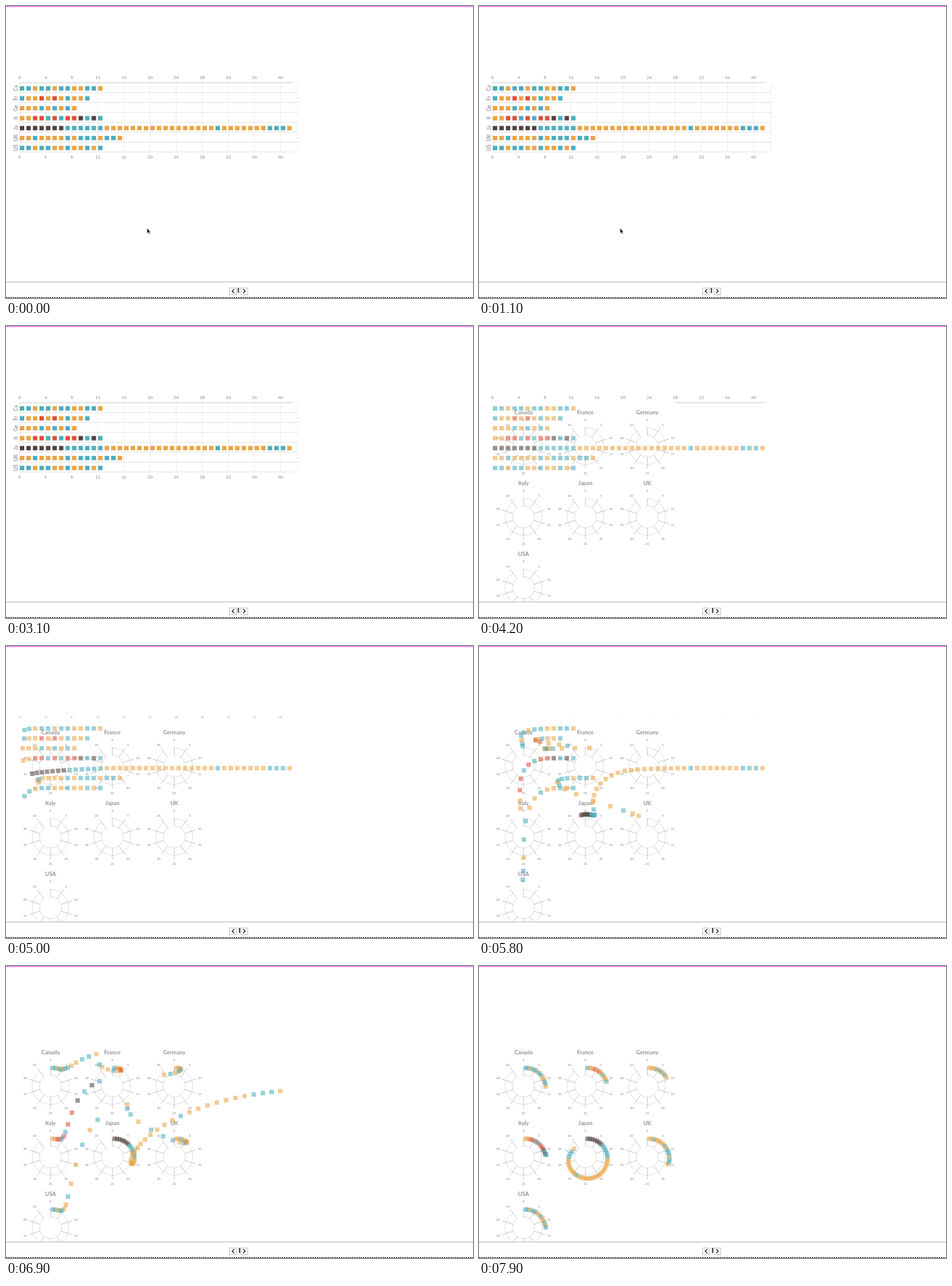
Animation of 640 by 400 pixels, one loop 8 s. Source, as an HTML page:

```html
<!DOCTYPE html>
<html lang="en">
<head>
<meta charset="utf-8">
<title>Bars to radial charts</title>
<style>
html, body { margin: 0; width: 100%; height: 100%; overflow: hidden; background: #fff; }
svg { display: block; width: 640px; height: 400px; }
text { font-family: Lato, "Open Sans", sans-serif; text-anchor: middle; }
.tick { font-size: 6px; fill: #888; }
.row { font-size: 6.8px; fill: #777; }
.title { font-size: 7.6px; font-weight: 700; fill: #929292; }
.mark { font-size: 4.3px; fill: #808080; }
.grid { stroke: #d8d8d8; stroke-width: .7; fill: none; }
.dash { stroke-dasharray: 3 2; }
.spoke { stroke: #aaa; stroke-width: .6; fill: none; }
.dots { stroke: #a8a8a8; stroke-width: .6; stroke-dasharray: 1.2 .8; fill: none; }
</style>
</head>
<body>
<svg id="stage" viewBox="0 0 640 400"></svg>
<script>
const LOOP = 8000, UNIT = 8.94, LEFT = 18.6, SIZE = 6;
const COLORS = { T: '#4bacbd', O: '#eaa443', R: '#dc4f3a', K: '#4f413f' };

// lag: points of (share of the row, delay)
const GROUPS = [
  { name: 'Canada', short: 'Ca', seq: 'TTOTTOTTOOTTO', lag: [[0, .03], [.385, .47], [1, .88]] },
  { name: 'France', short: 'Fr', seq: 'TOOROROTOOT', lag: [[0, .12], [1, .82]] },
  { name: 'Germany', short: 'Ge', seq: 'OOOTOTOTO', lag: [[0, .2], [1, .6]] },
  { name: 'Italy', short: 'It', seq: 'OORRTRTRRKTKT', lag: [[0, .09], [1, 1.02]] },
  { name: 'Japan', short: 'Ja',
    seq: 'K'.repeat(7) + 'T'.repeat(6) + 'O'.repeat(17) + 'T' + 'O'.repeat(7) + 'TTTO',
    lag: [[0, 0], [.26, .16], [.476, .544], [1, .95]] },
  { name: 'UK', short: 'UK', seq: 'OOTOOOOTOTTTOTTO', lag: [[0, 0], [1, .93]] },
  { name: 'USA', short: 'US', seq: 'TTOTTOOTOOTOT', lag: [[0, .03], [1, .94]] }
];
const CLOCK = [[4450, 0], [5800, .74], [6900, 1.16], [7900, 1.75], [8000, 1.81]];

const stage = document.getElementById('stage');
const clamp = v => Math.max(0, Math.min(1, v));
const span = (t, a, b) => clamp((t - a) / (b - a));
const ease = u => u < .5 ? 4 * u ** 3 : 1 - 4 * (1 - u) ** 3;

function lerpTable(rows, x) {
  if (x <= rows[0][0]) return rows[0][1];
  for (let k = 1; k < rows.length; k++) {
    const [a, va] = rows[k - 1], [b, vb] = rows[k];
    if (x <= b) return va + (vb - va) * (x - a) / (b - a);
  }
  return rows[rows.length - 1][1];
}

function add(parent, tag, attrs, text) {
  const el = document.createElementNS('http://www.w3.org/2000/svg', tag);
  for (const k in attrs) el.setAttribute(k, attrs[k]);
  if (text !== undefined) el.textContent = text;
  parent.appendChild(el);
  return el;
}
const line = (p, x1, y1, x2, y2, cls) => add(p, 'line', { x1, y1, x2, y2, class: cls });
const label = (p, x, y, cls, text) => add(p, 'text', { x, y, class: cls }, text);
const polar = (cx, cy, r, turn) => {
  const a = turn * 2 * Math.PI;
  return [cx + r * Math.sin(a), cy - r * Math.cos(a)];
};

// bar chart grid
const grid = add(stage, 'g', {});
const topTicks = [];
for (let v = 0; v <= 40; v += 4) {
  const x = LEFT + v * UNIT;
  line(grid, x, 105, x, 200, 'grid dash');
  label(grid, x, 209.4, 'tick', v);
  topTicks.push({ x, el: label(stage, 0, 2.2, 'tick', v) });
}
for (let r = 1; r <= 7; r++) line(grid, LEFT, 105 + r * 13.57, r < 7 ? 400 : 394, 105 + r * 13.57, 'grid');
line(grid, 400, 105, 400, 200, 'grid dash');
GROUPS.forEach((g, r) => add(grid, 'text', {
  class: 'row', transform: `translate(15.6 ${112.6 + r * 13.6}) rotate(-90)`
}, g.short));
const axis = add(stage, 'line', { y1: 105, y2: 105, x2: 394, stroke: '#c8c8c8', 'stroke-width': .9 });

// radial charts
const radial = add(stage, 'g', {});
GROUPS.forEach((g, n) => {
  const cx = g.cx = 61 + (n % 3) * 84.8;
  const cy = g.cy = 164.5 + Math.floor(n / 3) * 97;
  label(radial, cx, cy - 43.8, 'title', g.name);
  for (const r of [15, 25]) {
    const a = polar(cx, cy, r, 0), b = polar(cx, cy, r, .9);
    add(radial, 'path', { class: 'dots', d: `M${a}A${r} ${r} 0 1 1 ${b}` });
  }
  for (let k = 0; k < 10; k++) {
    line(radial, ...polar(cx, cy, 15, k / 10), ...polar(cx, cy, k ? 31 : 26, k / 10), 'spoke');
    const [x, y] = polar(cx, cy, 36.5, k / 10);
    label(radial, x, y + 1.6, 'mark', k * 5);
  }
});

// squares
const squares = [];
GROUPS.forEach((g, r) => [...g.seq].forEach((c, i) => squares.push({
  from: [22 + i * UNIT, 112.9 + r * 13.6],
  to: polar(g.cx + 3, g.cy + 2.4, 27.3, i / 50),
  lag: lerpTable(g.lag, i / g.seq.length),
  el: add(stage, 'rect', { x: -SIZE / 2, y: -SIZE / 2, width: SIZE, height: SIZE, fill: COLORS[c] })
})));

// page frame and controls
add(stage, 'rect', { width: 640, height: 1.3, fill: '#ff70ff' });
add(stage, 'rect', { y: 377.5, width: 640, height: 22.5, fill: '#fff' });
add(stage, 'rect', { y: 377.5, width: 640, height: 1, fill: '#b4b4b4' });
add(stage, 'line', { x2: 640, y1: 399.5, y2: 399.5, stroke: '#222', 'stroke-dasharray': '2 1' });
for (const [x, d] of [[311.2, -1], [326.6, 1]]) {
  add(stage, 'rect', { x: x - 4.7, y: 386.2, width: 9.4, height: 9, fill: '#fff', stroke: '#b8b8b8', 'stroke-width': .8 });
  add(stage, 'path', { d: `M${x - d * 1.4} 388l${d * 2.6} 2.7l${-d * 2.6} 2.7`, fill: 'none', stroke: '#222', 'stroke-width': 1.2 });
}
const caret = add(stage, 'rect', { y: 386, width: 1.6, height: 7, fill: '#333' });
const pointer = add(stage, 'path', {
  d: 'M193.3 304.6v6.6l1.6-1.4l1.1 2.5l1.2-.5l-1.1-2.4h2.1z',
  fill: '#111', stroke: '#fff', 'stroke-width': .3
});

const fade = (el, v) => el.setAttribute('opacity', v.toFixed(3));

function draw(t) {
  fade(grid, 1 - span(t, 3500, 4100));
  fade(radial, span(t, 3500, 4200));
  fade(pointer, t < 2800 ? 1 : 0);
  caret.setAttribute('x', t < 3500 ? 317.7 : 319.3);

  const wipe = span(t, 3550, 4530);
  axis.setAttribute('x1', LEFT + (394 - LEFT) * wipe);
  fade(axis, wipe < 1 ? 1 : 0);

  const shrink = 1 - span(t, 4300, 6200);
  for (const { x, el } of topTicks) {
    el.setAttribute('transform', `translate(${x} 97.5) scale(${shrink})`);
    fade(el, Math.sqrt(shrink));
  }

  const now = lerpTable(CLOCK, t);
  const alpha = 1 - .43 * span(t, 3500, 4250);
  for (const { from, to, lag, el } of squares) {
    const f = ease(clamp(now - lag));
    const x = from[0] + (to[0] - from[0]) * f, y = from[1] + (to[1] - from[1]) * f;
    el.setAttribute('transform', `translate(${x.toFixed(2)} ${y.toFixed(2)})`);
    fade(el, alpha);
  }
}

const start = performance.now();
function frame() {
  draw((performance.now() - start) % LOOP);
  requestAnimationFrame(frame);
}
frame();
</script>
</body>
</html>
```
